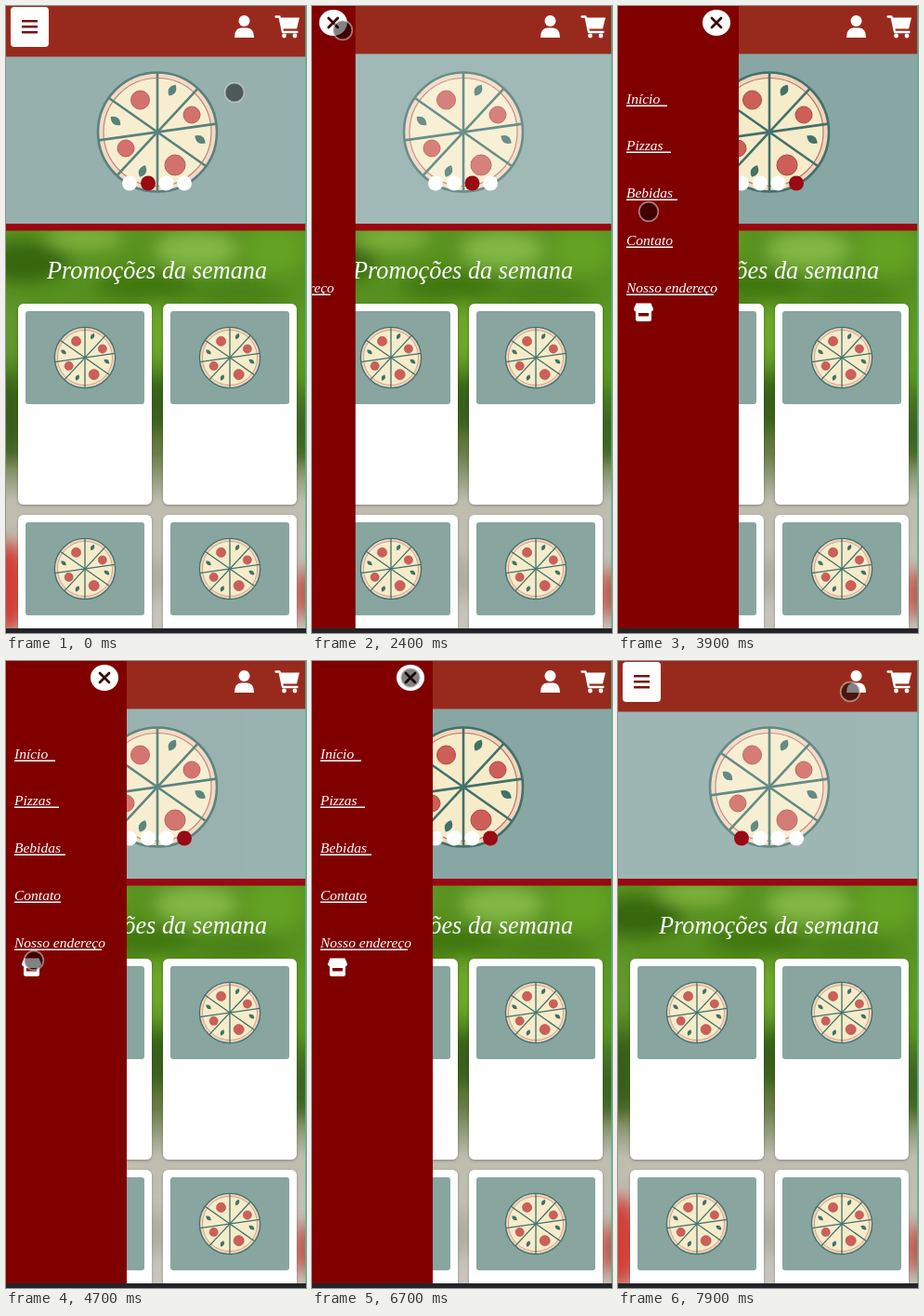
Animation, 323 px wide and 674 px high, one loop 8 s. Source, as an HTML page:

```html
<!DOCTYPE html>
<html lang="pt">
<head>
<meta charset="utf-8">
<title>Pizzaria</title>
<style>
  html, body { margin: 0; width: 100%; height: 100%; overflow: hidden; background: #232428; }
  svg { display: block; width: 323px; height: 674px; }
  text { font-family: "Liberation Serif", "Noto Serif", serif; font-style: italic; fill: #fff; }
</style>
</head>
<body>
<svg viewBox="0 0 323 674" xmlns="http://www.w3.org/2000/svg">
  <defs>
    <linearGradient id="foliage" x1="0" y1="241" x2="0" y2="669" gradientUnits="userSpaceOnUse">
      <stop offset="0" stop-color="#5a9220"/>
      <stop offset=".25" stop-color="#549020"/>
      <stop offset=".42" stop-color="#47751c"/>
      <stop offset=".56" stop-color="#6b7c48"/>
      <stop offset=".68" stop-color="#bdbcae"/>
      <stop offset="1" stop-color="#c9c5bd"/>
    </linearGradient>
    <filter id="soft" x="-50%" y="-50%" width="200%" height="200%"><feGaussianBlur stdDeviation="9"/></filter>
    <filter id="shadow" x="-10%" y="-10%" width="120%" height="120%"><feDropShadow dx="0" dy="1" stdDeviation="1.5" flood-opacity=".3"/></filter>
    <clipPath id="page"><rect y="241" width="323" height="428"/></clipPath>
    <clipPath id="view"><rect width="323" height="669"/></clipPath>
    <g id="pizza">
      <circle r="64" fill="#f1d5bd" stroke="#41716b" stroke-width="2.6"/>
      <circle r="58" fill="#f6ecca" stroke="#b5786a" stroke-width="1.2"/>
      <g id="cuts" stroke="#41716b" stroke-width="2.6"/>
      <g fill="#cd5f59" stroke="#a94a45">
        <circle cx="-18.500" cy="-34.500" r="10"/>
        <circle cx="37" cy="-18.500" r="9"/>
        <circle cx="-34" cy="17.500" r="9"/>
        <circle cx="19" cy="35.500" r="11"/>
      </g>
      <g id="leaves" fill="#41716b"/>
    </g>
    <g id="card">
      <rect width="144" height="216" rx="6" fill="#fff" filter="url(#shadow)"/>
      <rect x="8" y="8" width="128" height="100" rx="3" fill="#88a5a0"/>
      <use href="#pizza" transform="translate(72 58) scale(.51)"/>
    </g>
  </defs>

  <rect width="323" height="674" fill="#fff"/>
  <g id="banner">
    <rect y="50" width="323" height="185" fill="#88a6a3"/>
    <use href="#pizza" x="163" y="135.500"/>
  </g>
  <g id="dots"></g>

  <g clip-path="url(#page)">
    <rect y="241" width="323" height="428" fill="url(#foliage)"/>
    <g id="blobs" filter="url(#soft)"></g>
  </g>
  <rect y="234" width="323" height="7.500" fill="#9b0712"/>
  <text x="44" y="293" font-size="26.300">Promoções da semana</text>
  <g clip-path="url(#view)">
    <use href="#card" x="13" y="320"/>
    <use href="#card" x="169" y="320"/>
    <use href="#card" x="13" y="547"/>
    <use href="#card" x="169" y="547"/>
  </g>

  <rect id="header" width="323" height="54.500" fill="#982a1d"/>
  <g fill="#fff">
    <circle cx="256.500" cy="16" r="6"/>
    <path d="M246 34q0-10.500 7.500-10.500h6q7.500 0 7.500 10.500z"/>
    <path d="M294.500 12.500H316l-3 12h-16z"/>
    <circle cx="299.500" cy="32" r="2.400"/>
    <circle cx="311" cy="32" r="2.400"/>
  </g>
  <path d="M290.500 11.500h4l3.500 16.500h15.500" fill="none" stroke="#fff" stroke-width="2.300" stroke-linecap="round" stroke-linejoin="round"/>
  <g id="burger">
    <rect x="5" y="1" width="41" height="43" rx="4" fill="#fff"/>
    <path d="M17 16.200h17M17 22.200h17M17 28.200h17" stroke="#741414" stroke-width="2.500"/>
  </g>
  <rect x="322" width="1" height="669" fill="#32c78f" opacity=".8"/>

  <g id="menu">
    <rect width="130" height="669" fill="#800000"/>
    <ellipse cx="106" cy="18" rx="15" ry="14" fill="#fff"/>
    <path d="M101 13l10 10m0-10l-10 10" stroke="#3a0a0a" stroke-width="2.800" stroke-linecap="round"/>
    <g id="links"></g>
    <g fill="#fff">
      <path d="M19.500 319.500h16l2.500 6q0 3-3 3H20q-3 0-3-3z"/>
      <path d="M19 328h17v8.500q0 2.500-2.500 2.500h-12q-2.500 0-2.500-2.500z"/>
    </g>
    <path d="M22 330h11v3.500H22z" fill="#800000"/>
  </g>
  <rect y="669" width="323" height="5" fill="#232428"/>

  <g id="pointer">
    <circle id="touch" r="10.300" fill="#000" fill-opacity=".49" stroke="#dcdcdc" stroke-opacity=".55" stroke-width="1.700"/>
    <path id="arrow" d="M0 0v14.500l3.400-3.200 2.500 5.800 2.400-1-2.500-5.700h4.700z" fill="#000" stroke="#fff"/>
  </g>
</svg>
<script>
const LOOP = 8000;
const $ = id => document.getElementById(id);

function add(parent, tag, attrs, text) {
  const el = document.createElementNS("http://www.w3.org/2000/svg", tag);
  for (const key in attrs) el.setAttribute(key, attrs[key]);
  if (text) el.textContent = text;
  return $(parent).appendChild(el);
}

for (const angle of [90, -8, -47, 35])
  add("cuts", "path", { d: "M-64 0H64", transform: `rotate(${angle})` });

for (const [x, y, angle] of [[16, -45, -60], [-45, -12, 40], [46, 8, 35], [-16, 42, -65]])
  add("leaves", "path", { d: "M-7 0Q0-8 7 0Q0 8-7 0", transform: `translate(${x} ${y}) rotate(${angle})` });

// Out-of-focus leaves and tomatoes: x, y, rx, ry, colour
for (const [cx, cy, rx, ry, fill] of [
  [20, 275, 50, 22, "#34660c"], [85, 250, 42, 12, "#80b43c"], [150, 300, 55, 16, "#3f7710"],
  [205, 262, 45, 20, "#82b744"], [290, 262, 32, 28, "#64a222"], [250, 308, 50, 12, "#477f14"],
  [4, 350, 16, 35, "#63992f"], [163, 355, 14, 35, "#72ab2b"], [320, 365, 14, 50, "#5f9b24"],
  [4, 445, 14, 45, "#365a18"], [163, 430, 14, 30, "#365b12"], [320, 460, 14, 30, "#38621a"],
  [2, 625, 22, 50, "#d23c35"], [162, 615, 9, 25, "#a3a596"], [322, 632, 12, 28, "#bf4a40"]
]) add("blobs", "ellipse", { cx, cy, rx, ry, fill });

for (const [label, y, end] of [
  ["Início", 105, 53], ["Pizzas", 155, 57], ["Bebidas", 206, 64], ["Contato", 257, 59], ["Nosso endereço", 308, 103]
]) {
  add("links", "text", { x: 9, y, "font-size": 15.5 }, label);
  add("links", "path", { d: `M9 ${y + 2.2}H${end}`, stroke: "#fff", "stroke-width": 1.5 });
}

const dots = [133, 153, 172.5, 192].map(cx => add("dots", "circle", { cx, cy: 190.5, r: 8 }));

const clamp = v => Math.max(0, Math.min(1, v));
const easeOut = p => 1 - (1 - p) ** 2;
const slide = (t, start) => easeOut(clamp((t - start) / 500));

function recorded(t) {
  for (const [from, to, shown] of [[0, 300, 0], [600, 1700, 600], [5700, 5900, 5700]])
    if (t >= from && t < to) return shown;
  return Math.floor(t / 100) * 100;
}

// time, x, y
const path = [
  [300, 246, 93], [600, 33, 26], [2900, 33, 26], [3400, 33, 105], [3900, 33, 221],
  [4400, 30, 305], [4800, 30, 325], [5300, 95, 32], [5700, 95, 32], [6100, 106, 18],
  [7000, 106, 18], [7900, 250, 33]
];

function pointerAt(t) {
  const next = path.findIndex(key => key[0] >= t);
  if (next <= 0) return path.at(next).slice(1);
  const [a, b] = [path[next - 1], path[next]];
  const p = (t - a[0]) / (b[0] - a[0]);
  const s = p * p * (3 - 2 * p);
  return [a[1] + (b[1] - a[1]) * s, a[2] + (b[2] - a[2]) * s];
}

function show(el, visible) {
  el.setAttribute("visibility", visible ? "visible" : "hidden");
}

function draw(time) {
  const t = recorded(time % LOOP);
  const phase = (t - 800) / 3000;
  const current = (Math.floor(phase) + 2) % 4;
  $("banner").setAttribute("opacity", 0.89 + 0.11 * Math.cos(2 * Math.PI * phase));
  dots.forEach((dot, i) => dot.setAttribute("fill", i === current ? "#990a13" : "#fff"));

  const open = slide(t, 2300) - slide(t, 6900);
  const active = t >= 2300 && t < 7400;
  $("menu").setAttribute("transform", `translate(${130 * (open - 1)} 0)`);
  show($("menu"), active);
  show($("burger"), !active);
  $("header").setAttribute("height", active ? 51.5 : 54.5);

  const arrow = t >= 5300 && t < 5900;
  show($("arrow"), arrow);
  show($("touch"), !arrow);
  $("pointer").setAttribute("transform", `translate(${pointerAt(t)})`);
}

const began = performance.now();
function tick() {
  draw(performance.now() - began);
  requestAnimationFrame(tick);
}
tick();
</script>
</body>
</html>
```
